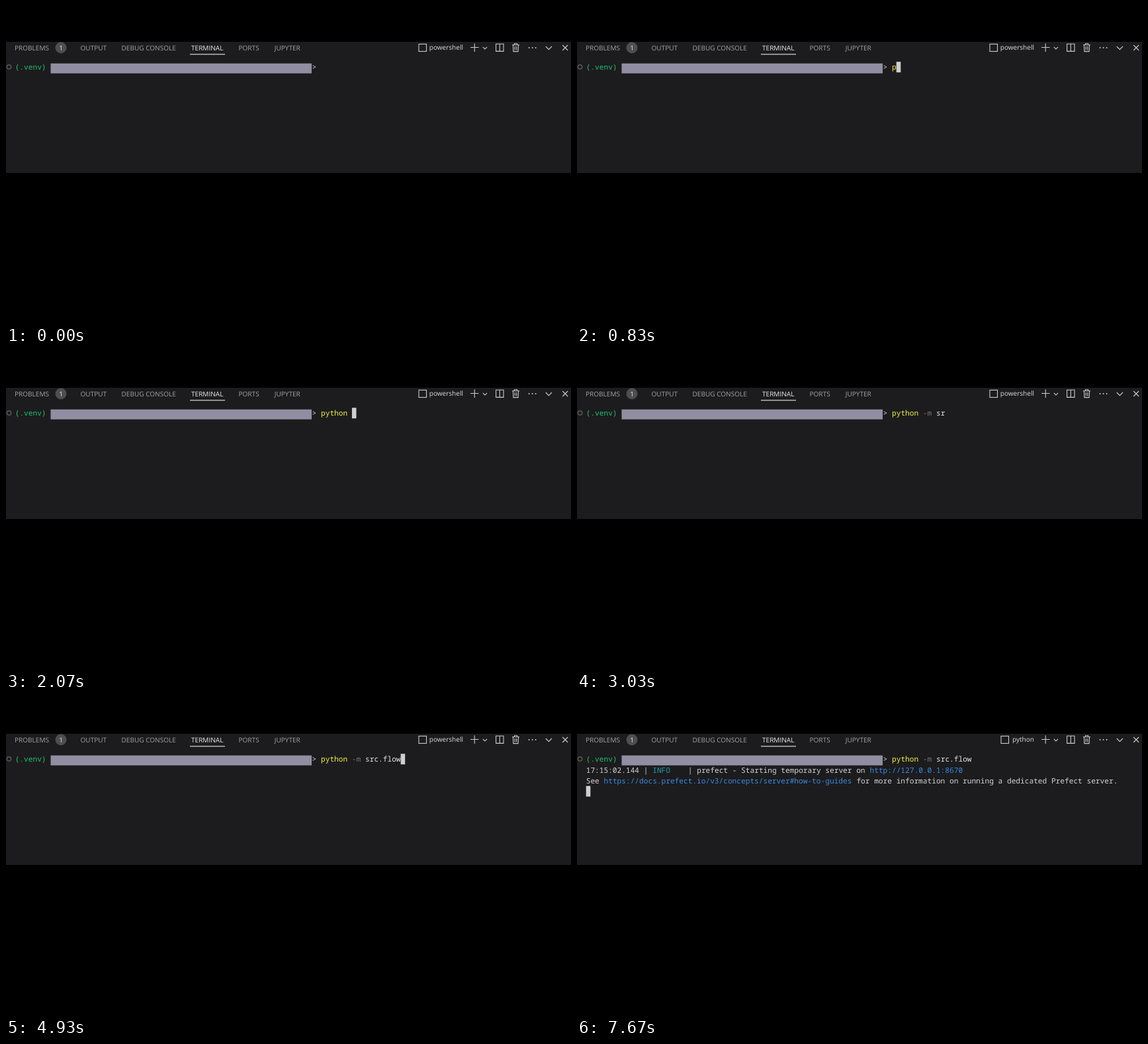
An HTML page for the animation above (8000 ms loop, 854 by 480 pixels).

```html
<!DOCTYPE html>
<html lang="en">
<head>
<meta charset="utf-8">
<title>Terminal session</title>
<style>
  html, body { margin: 0; width: 100%; height: 100%; overflow: hidden; background: #000; }
  svg { display: block; width: 854px; height: 480px; }
  text { text-rendering: geometricPrecision; white-space: pre; }
  .ui text { font: 10.05px "Open Sans", "Noto Sans", sans-serif; fill: #a2a2a2; }
  .ui .active { fill: #ececec; }
  .ui .title { fill: #dcdcdc; }
  .icons { fill: none; stroke: #cacaca; stroke-width: 1.1; }
  .icons .dots { fill: #cacaca; stroke: none; }
  #term text { font: 500 11.167px "Noto Sans Mono", "DejaVu Sans Mono", monospace; fill: #d4d4d4; }
  #term .env { fill: #22c070; }
  #term .cmd { fill: #f2f044; }
  #term .flag { fill: #747474; }
  #term .arg { fill: #e6e6e6; }
  #term .info { fill: #1f9ca8; }
  #term .link { fill: #3b8ae0; }
</style>
</head>
<body>
<svg viewBox="0 0 854 480">
  <rect y="54" width="854" height="198" fill="#1c1c1e"/>

  <g class="ui">
    <text x="13" y="66.7">PROBLEMS</text>
    <circle cx="83" cy="63" r="8.5" fill="#4e4e50"/>
    <text class="active" x="80.2" y="66.7">1</text>
    <text x="112.5" y="66.7">OUTPUT</text>
    <text x="174.5" y="66.7">DEBUG CONSOLE</text>
    <text class="active" x="280" y="66.7">TERMINAL</text>
    <rect x="278" y="72.3" width="53" height="1.2" fill="#dcdcdc"/>
    <text x="351.5" y="66.7">PORTS</text>
    <text x="405.8" y="66.7">JUPYTER</text>
    <text class="title" id="title" x="691" y="66.2" text-anchor="end"></text>
  </g>

  <g class="icons">
    <rect id="shell" x="624" y="57.5" width="11.5" height="11"/>
    <path d="M702 62.5h12.5M708.2 56.5v12.5"/>
    <path d="M720.7 61.8l3.2 3.2 3.2-3.2"/>
    <path d="M740.6 57.2h11.4v11.2h-11.4zM746.3 57.2v11.2"/>
    <path d="M765 58.8h11M768.4 58.5v-1.8h4.2v1.8M766.4 59l.5 9.6h7.2l.5-9.6M769.2 61v5.6M771.8 61v5.6"/>
    <g class="dots">
      <circle cx="790.6" cy="63" r="1"/><circle cx="795.6" cy="63" r="1"/><circle cx="800.6" cy="63" r="1"/>
    </g>
    <path d="M815.8 61l4.6 4.6 4.6-4.6"/>
    <path d="M841.2 59l8 8M849.2 59l-8 8"/>
  </g>

  <circle cx="4.5" cy="92" r="3.2" fill="none" stroke="#66665c" stroke-width="1.2"/>
  <rect x="67.5" y="86.7" width="394.5" height="15" fill="#918ea2"/>
  <g id="term"></g>
  <rect id="cursor" width="6.6" height="16" fill="#cfcfcf"/>
</svg>

<script>
const LOOP = 8000, LEFT = 13.7, CELL = 6.7, ROW = 16.2, PROMPT = 69;
const FIRST_KEY = 810, KEY_STEP = 195;
const ENTER = 5000, RENAME = 6400, OUTPUT = 7500;
const $ = id => document.getElementById(id);

// Spans in which the cursor is hidden
const hidden = [[0, 570], [3020, 3070], [4200, 4930]];

function put(row, col, str, cls = "") {
  const el = document.createElementNS("http://www.w3.org/2000/svg", "text");
  el.setAttribute("x", LEFT + col * CELL);
  el.setAttribute("y", 96.3 + row * ROW);
  el.setAttribute("class", cls);
  el.textContent = str;
  $("term").append(el);
  return el;
}

put(0, 0, "(.venv)", "env");
put(0, 67, ">");

const typed = [[0, "python", "cmd"], [7, "-m", "flag"], [10, "src.flow", "arg"]]
  .map(([at, str, cls]) => ({ at, str, el: put(0, PROMPT + at, "", cls) }));
const total = typed[2].at + typed[2].str.length;

const output = [
  put(1, 0, "17:15:02.144 |"),
  put(1, 15, "INFO", "info"),
  put(1, 23, "| prefect - Starting temporary server on"),
  put(1, 64, "http://127.0.0.1:8670", "link"),
  put(2, 0, "See"),
  put(2, 4, "https://docs.prefect.io/v3/concepts/server#how-to-guides", "link"),
  put(2, 61, "for more information on running a dedicated Prefect server.")
];

const show = (el, on) => el.setAttribute("visibility", on ? "visible" : "hidden");

function render(t) {
  const keys = Math.floor((t - FIRST_KEY) / KEY_STEP) + 1;
  const count = Math.min(total, Math.max(0, keys));
  for (const { at, str, el } of typed) el.textContent = str.slice(0, Math.max(0, count - at));

  const renamed = t >= RENAME;
  $("title").textContent = renamed ? "python" : "powershell";
  $("shell").setAttribute("x", renamed ? 641 : 624);

  for (const el of output) show(el, t >= OUTPUT);

  const row = t >= OUTPUT ? 3 : t >= ENTER ? 1 : 0;
  const col = row ? 0 : PROMPT + count;
  $("cursor").setAttribute("x", LEFT + col * CELL);
  $("cursor").setAttribute("y", 84.2 + row * ROW);
  show($("cursor"), !hidden.some(([a, b]) => t >= a && t < b));
}

const start = performance.now();
function tick() {
  render((performance.now() - start) % LOOP);
  requestAnimationFrame(tick);
}
tick();
</script>
</body>
</html>
```
